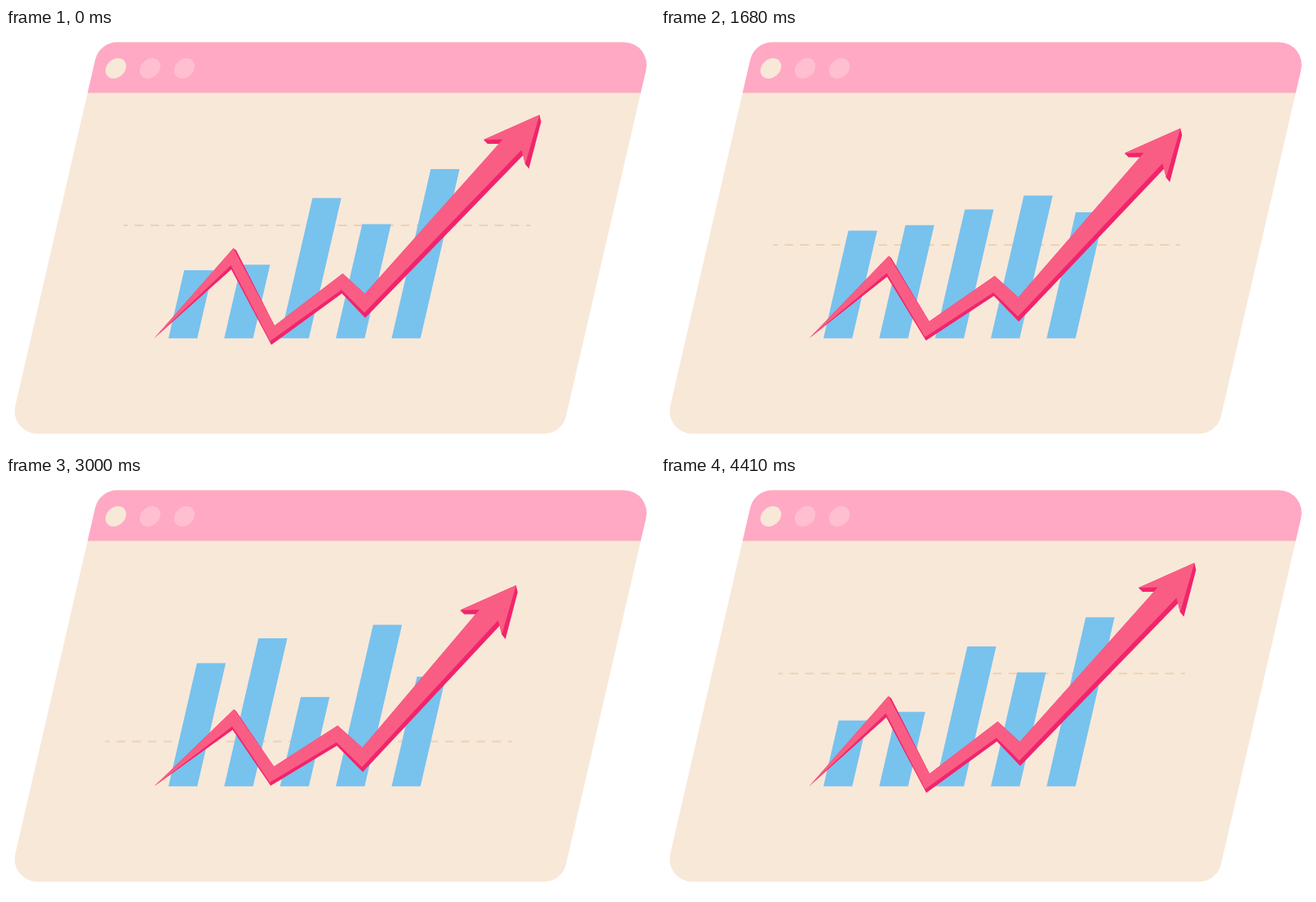
These frames come from a looping animation (795x515 px, 4440 ms). An HTML page with a canvas:

```html
<!DOCTYPE html>
<html lang="en">
<head>
<meta charset="utf-8">
<title>Growth chart</title>
<style>
html, body { margin: 0; width: 100%; height: 100%; overflow: hidden; background: #fff; }
canvas { display: block; }
</style>
</head>
<body>
<canvas id="stage" width="795" height="515"></canvas>
<script>
const ctx = document.getElementById('stage').getContext('2d');
const LOOP = 4440, HALF = LOOP / 4, STEP = 30;
const SKEW = Math.tan(13 * Math.PI / 180);
const BASE = 380.5;

// Top edge of each bar at the four turning points of the loop.
const bars = [
  [309, 201.5, 258, 229],
  [287, 340, 211, 198.5],
  [209.8, 166, 248.3, 273],
  [240.9, 193, 213.5, 177.5],
  [173, 266.5, 188.7, 260.6],
];

// Arrow points: x, y, and the shift at the low pose. The head moves as one piece.
const HEAD = [-36, 34.5];
const head = (x, y) => [x, y, ...HEAD];
const tail = [181.5, 380.5, 0, 0];
const peak1 = [278.5, 270, 1, 20];
const dip1 = [329, 365, -1, -11];
const peak2 = [412.5, 301, -7.8, 6.3];
const dip2 = [439.5, 326, -3.7, 9];
const barb = head(585, 137), tip = head(653.5, 106.5);

const face = [
  tail, peak1, dip1, peak2, dip2,
  head(608.5, 136.5), barb, tip, head(636, 167), head(631.5, 149.5),
  [439, 349, -3.7, 10], [411, 321, -7.8, 7], [323.5, 384, -0.5, -10.5], [275.5, 291, 2, 20],
];
const side = [
  tail, peak1, [282, 272.5, 0, 20], dip1, peak2, dip2,
  head(604, 142), head(590, 142), barb, tip,
  head(655.5, 115), head(640.5, 172.5), head(636, 167), head(633.5, 156),
  [440, 355.5, -3.7, 9.5], [411.5, 325.5, -7.8, 6.5], [325, 388.5, -1, -11], [276, 296, 2, 19],
];

// Eased value at time t, running through four evenly spaced keys.
function wave(keys, t) {
  const pos = (t % LOOP) / HALF, i = Math.floor(pos);
  const p = (1 - Math.cos(Math.PI * (pos - i))) / 2;
  return keys[i] + (keys[(i + 1) % 4] - keys[i]) * p;
}

function polygon(points, color) {
  ctx.beginPath();
  points.forEach(([x, y]) => ctx.lineTo(x, y));
  ctx.fillStyle = color;
  ctx.fill();
}

function drawWindow() {
  const top = 17.5, bottom = 497.5, left = 3.5, right = 681, radius = 27.5;
  const lean = (bottom - top) * SKEW;
  ctx.save();
  ctx.beginPath();
  ctx.moveTo(400, top);
  ctx.arcTo(right + lean, top, right, bottom, radius);
  ctx.arcTo(right, bottom, left, bottom, radius);
  ctx.arcTo(left, bottom, left + lean, top, radius);
  ctx.arcTo(left + lean, top, 400, top, radius);
  ctx.closePath();
  ctx.fillStyle = '#f8e8d8';
  ctx.fill();
  ctx.clip();
  ctx.fillStyle = '#ffa9c4';
  ctx.fillRect(0, 0, 795, 79.5);
  ctx.restore();

  ['#f8e8d8', '#ffbfd0', '#ffbfd0'].forEach((color, i) => {
    ctx.save();
    ctx.transform(1, 0, -SKEW, 1, 134.5 + 42 * i, 49.5);
    ctx.beginPath();
    ctx.arc(0, 0, 12.4, 0, 2 * Math.PI);
    ctx.fillStyle = color;
    ctx.fill();
    ctx.restore();
  });
}

function drawGuide(t) {
  const x = 143.8 + wave([0, -13, 0, -28], t), y = 242 + wave([0, 50.3, 0, 104.7], t);
  const length = 498.5, dash = 10.5;
  ctx.setLineDash([dash, length / 26 - dash]);
  ctx.lineDashOffset = dash / 2;
  ctx.lineWidth = 2;
  ctx.strokeStyle = '#efd1b1';
  ctx.beginPath();
  ctx.moveTo(x, y);
  ctx.lineTo(x + length, y);
  ctx.stroke();
}

function drawBars(t) {
  bars.forEach((keys, i) => {
    const x = 199 + 68.35 * i, width = 35.3;
    const top = wave(keys, t + 60 * (4 - i)), lean = (BASE - top) * SKEW;
    polygon([[x, BASE], [x + lean, top], [x + lean + width, top], [x + width, BASE]], '#78c2ee');
  });
}

function drawArrow(t) {
  const p = wave([0, 1, 0, 1], t);
  const pose = points => points.map(([x, y, dx, dy]) => [x + dx * p, y + dy * p]);
  polygon(pose(side), '#f1246b');
  polygon(pose(face), '#f95d84');
}

const start = performance.now();
function frame() {
  const elapsed = performance.now() - start;
  const t = Math.floor(elapsed / STEP) * STEP % LOOP;
  ctx.clearRect(0, 0, 795, 515);
  drawWindow();
  drawGuide(t);
  drawBars(t);
  drawArrow(t);
  requestAnimationFrame(frame);
}
frame();
</script>
</body>
</html>
```
